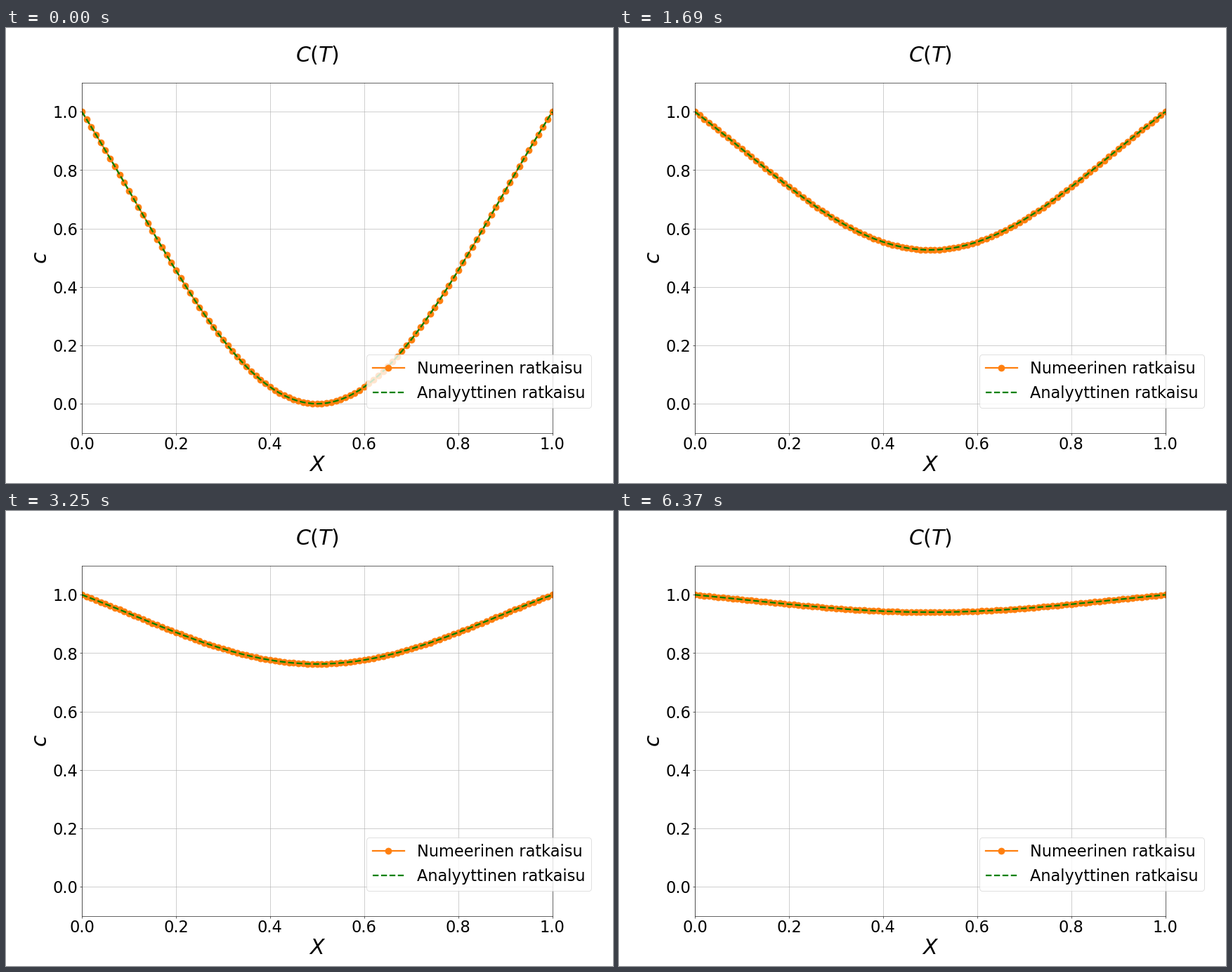
Write a matplotlib script that moves like this. It is 864 px wide and 648 px high and loops after 6.5 s.

```python
import numpy as np
import matplotlib.pyplot as plt
from matplotlib.animation import FuncAnimation

FRAMES, INTERVAL = 50, 130
DECAY = 0.0576

plt.rcParams.update({"font.family": "DejaVu Sans", "font.size": 30})

x = np.linspace(0, 1, 101)
s = np.sin(np.pi * x)
profile = 0.817 * s + 0.183 * s**2


def concentration(frame):
    """Deficit profile that fades exponentially towards c = 1."""
    return 1 - profile * np.exp(-DECAY * frame)


fig, ax = plt.subplots(figsize=(16, 12), dpi=54)
fig.subplots_adjust(left=0.125, right=0.9, bottom=0.11, top=0.88)
ax.set(xlim=(0, 1), ylim=(-0.1, 1.1))
ax.set_yticks(np.arange(0, 1.1, 0.2))
ax.grid(True)
ax.set_title("$C(T)$", fontsize=40, pad=40)
ax.set_xlabel("$X$", fontsize=40)
ax.set_ylabel("$c$", fontsize=40)

numeric, = ax.plot(x, concentration(0), "o-", color="tab:orange",
                   lw=3, ms=12, label="Numeerinen ratkaisu")
analytic, = ax.plot(x, concentration(0), "--", color="green",
                    lw=3, label="Analyyttinen ratkaisu")
ax.legend(loc="lower right", bbox_to_anchor=(1.1, 0.05))


def update(frame):
    for line in (numeric, analytic):
        line.set_ydata(concentration(frame))
    return numeric, analytic


anim = FuncAnimation(fig, update, frames=FRAMES, interval=INTERVAL,
                     repeat=True, repeat_delay=0)
plt.show()
```
